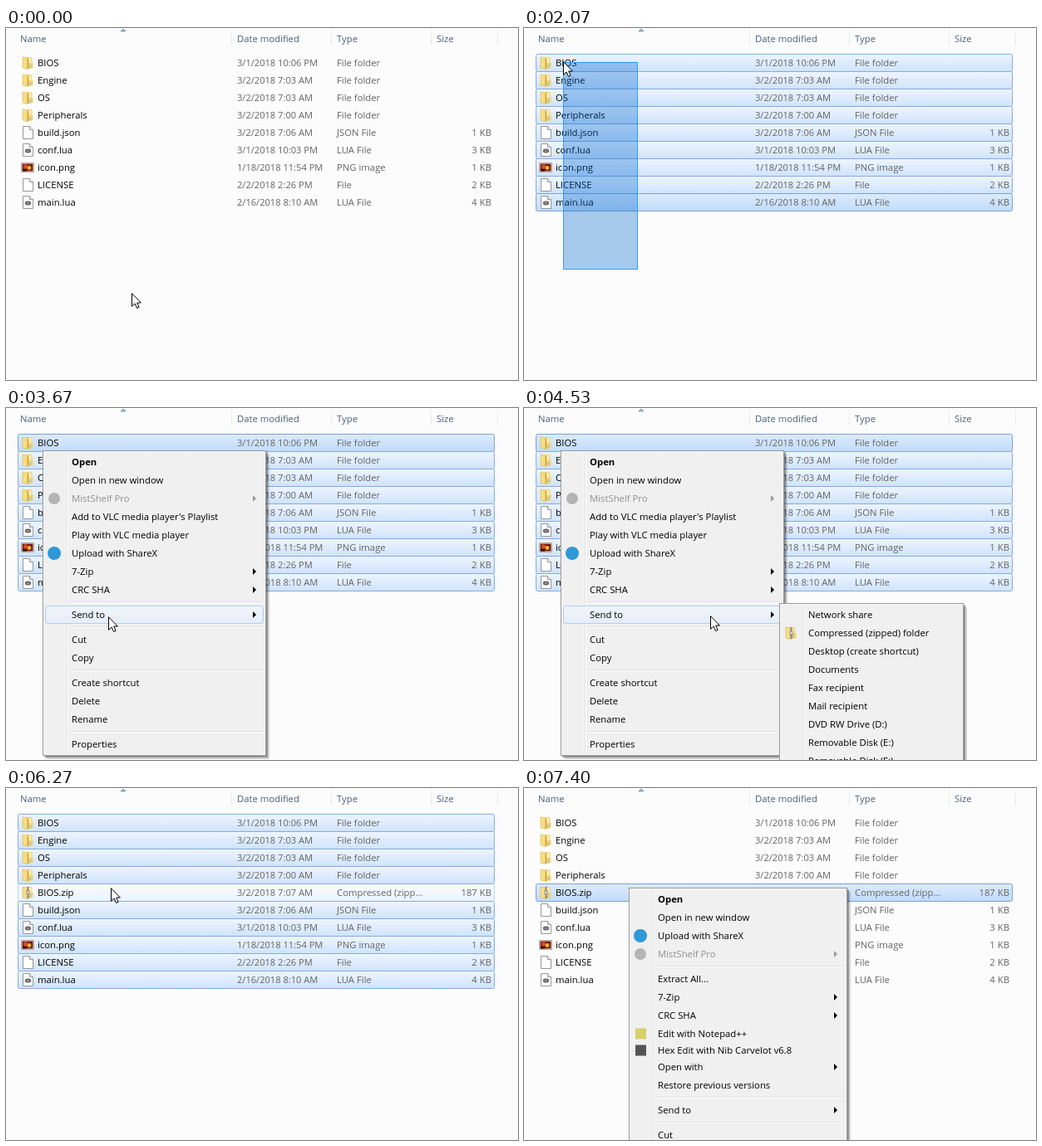
Write an HTML page that moves like this. It is 616 px wide and 424 px high and loops after 8 s.

```html
<!DOCTYPE html>
<html lang="en">
<head>
<meta charset="utf-8">
<title>File list</title>
<style>
html, body { margin: 0; width: 100%; height: 100%; overflow: hidden; background: #fcfcfc; }
svg { display: block; width: 616px; height: 424px; }
text { font: 11.3px "Open Sans", "Noto Sans", sans-serif; fill: #000; white-space: pre; }
.head text { fill: #4c607a; }
.meta { fill: #646464; }
.date { font-size: 11.1px; }
.end { text-anchor: end; }
.bold { font-weight: 700; }
.off { fill: #8f8f8f; }
.plate { stroke: none; fill: none; }
.picked { fill: url(#picked); stroke: #84acdd; }
.dark { fill: url(#dark); stroke: #7da2ce; }
.hover { fill: url(#hover); stroke: #b8d6fb; }
.hot { fill: url(#hot); stroke: #aecff7; }
.band { fill: rgba(0, 102, 204, .34); stroke: #39f; }
</style>
</head>
<body>
<svg id="stage" viewBox="0 0 616 424">
  <defs>
    <g id="folder">
      <path d="M7 1H12.5L13.5 2V8H14.5V14L9 15.5H7Z" fill="#f0d272"/>
      <path d="M9.5 2H12.5V8H9.5Z" fill="#faeeb8"/>
      <path d="M2 1 7.5 2V15.5L2 14Z" fill="#f6de86" stroke="#dcb850" stroke-width=".6"/>
      <path d="M8.5 3V15" stroke="#c99f3c"/>
      <path d="M10 10.5H12V13.5L10 14Z" fill="#a9c3c9"/>
    </g>
    <g id="zip">
      <use href="#folder"/>
      <path d="M8.5 1V15" stroke="#77756a" stroke-width="2.4" stroke-dasharray="1.2 1"/>
      <rect x="7" y="6" width="3" height="4" fill="#ddd" stroke="#777" stroke-width=".7"/>
    </g>
    <g id="page">
      <path d="M2.5 .5H10.5L14.5 4.5V15.5H2.5Z" fill="#fff" stroke="#979797"/>
      <path d="M10.5 .5V4.5H14.5" fill="#eee" stroke="#979797"/>
    </g>
    <g id="script">
      <use href="#page"/>
      <rect x="5" y="7" width="7" height="4" rx="1.2" fill="#6a6a6a"/>
      <path d="M6.5 6.5H10.5M6.5 11.5H10.5M7 9H10" stroke="#b5b5b5"/>
    </g>
    <g id="picture">
      <rect x=".5" y="2.5" width="15" height="11" fill="#fff" stroke="#b9a8a0"/>
      <rect x="1.5" y="3.5" width="13" height="9" fill="#6e1a0e"/>
      <circle cx="5.5" cy="7" r="2.7" fill="#d9481c"/>
      <circle cx="10" cy="8.5" r="2.4" fill="#f2b32c"/>
      <rect x="2" y="10" width="5" height="2.5" fill="#2c120c"/>
    </g>
  </defs>
</svg>
<script>
const stage = document.getElementById('stage');

function el(tag, attrs, parent = stage, text) {
  const node = document.createElementNS('http://www.w3.org/2000/svg', tag);
  for (const key in attrs) node.setAttribute(key, attrs[key]);
  if (text) node.textContent = text;
  parent.append(node);
  return node;
}
const label = (x, y, str, parent, cls = '') => el('text', { x, y, class: cls }, parent, str);
const box = (x, y, width, height, attrs, parent) => el('rect', { x, y, width, height, ...attrs }, parent);
const show = (node, on) => { node.style.display = on ? '' : 'none'; };

function gradient(id, top, bottom) {
  const g = el('linearGradient', { id, x2: 0, y2: 1 }, stage.querySelector('defs'));
  el('stop', { offset: 0, 'stop-color': top }, g);
  el('stop', { offset: 1, 'stop-color': bottom }, g);
}
gradient('picked', '#eef5fe', '#cfe3fd');
gradient('dark', '#dcebfc', '#c1dbfc');
gradient('hover', '#fafbfd', '#ebf3fd');
gradient('hot', '#f1f5fa', '#e5edf7');
gradient('rule', '#f4f7fb', '#d9e3ee');

// Column header
const head = el('g', { class: 'head' });
[['Name', 17], ['Date modified', 278], ['Type', 398], ['Size', 518]]
  .forEach(([str, x]) => label(x, 17, str, head));
for (const x of [271, 391, 511, 591]) box(x, 0, 1, 20, { fill: 'url(#rule)' }, head);
el('path', { d: 'M138 4 141 1 144 4Z', fill: '#9fcbe0', stroke: '#4f7f9e', 'stroke-width': .7 }, head);

// File rows
const ZIP = 4;
const PITCH = 21;
const rows = [
  ['folder', 'BIOS', '3/1/2018 10:06 PM', 'File folder'],
  ['folder', 'Engine', '3/2/2018 7:03 AM', 'File folder'],
  ['folder', 'OS', '3/2/2018 7:03 AM', 'File folder'],
  ['folder', 'Peripherals', '3/2/2018 7:00 AM', 'File folder'],
  ['zip', 'BIOS.zip', '3/2/2018 7:07 AM', 'Compressed (zipp...', '187 KB'],
  ['page', 'build.json', '3/2/2018 7:06 AM', 'JSON File', '1 KB'],
  ['script', 'conf.lua', '3/1/2018 10:03 PM', 'LUA File', '3 KB'],
  ['picture', 'icon.png', '1/18/2018 11:54 PM', 'PNG image', '1 KB'],
  ['page', 'LICENSE', '2/2/2018 2:26 PM', 'File', '2 KB'],
  ['script', 'main.lua', '2/16/2018 8:10 AM', 'LUA File', '4 KB']
].map(([icon, name, date, type, size]) => {
  const g = el('g');
  const plate = box(14.5, .5, 573, 21, { rx: 2, class: 'plate' }, g);
  el('use', { href: '#' + icon, x: 18, y: 3 }, g);
  label(38, 15, name, g);
  label(278, 15, date, g, 'meta date');
  label(398, 15, type, g, 'meta');
  if (size) label(584, 15, size, g, 'meta end');
  return { g, plate };
});
// Borders of picked neighbours lie over the hovered row
rows[0].g.before(rows[ZIP].g);

const band = box(0, 0, 0, 0, { class: 'band' });

// Context menus: '-' is a separator
function makeMenu(x, y, width, entries) {
  const g = el('g');
  const base = el('g', {}, g);
  const items = [];
  let top = y + 3;
  const rules = [];
  for (const entry of entries) {
    if (entry === '-') { rules.push(top + 3); top += 8; continue; }
    const [str, o = {}] = [].concat(entry);
    const height = o.h || 22;
    const mid = top + height / 2;
    const item = el('g', {}, g);
    const plate = box(x + 3.5, top + .5, width - 7, height - 1, { rx: 2.5, class: 'hot' }, item);
    if (o.dot) el('circle', { cx: x + 14, cy: mid, r: o.r || 7, fill: o.dot }, item);
    if (o.square) box(x + 8, mid - 6.5, 13, 13, { fill: o.square }, item);
    if (o.icon) el('use', { href: '#' + o.icon, x: x + 6, y: mid - 8 }, item);
    label(x + 35, mid + 4, str, item, o.off ? 'off' : o.bold ? 'bold' : '');
    if (o.arrow) el('path', { d: `M${x + width - 16} ${mid - 4}l4 4-4 4Z`, fill: o.off ? '#999' : '#000' }, item);
    items.push({ g: item, plate, str, top, bottom: top + height });
    top += height;
  }
  const height = top + 3 - y;
  box(x + 4, y + 4, width, height, { fill: '#000', opacity: .16, rx: 2 }, base);
  box(x + 2, y + 2, width, height, { fill: '#000', opacity: .3, rx: 1 }, base);
  box(x + .5, y + .5, width - 1, height - 1, { fill: '#f0f0f0', stroke: '#979797' }, base);
  box(x + 1.5, y + 1.5, width - 3, height - 3, { fill: 'none', stroke: '#f7f7f7' }, base);
  box(x + 29, y + 3, 1, height - 6, { fill: '#e2e3e3' }, base);
  box(x + 30, y + 3, 1, height - 6, { fill: '#fff' }, base);
  for (const r of rules) {
    box(x + 31, r, width - 34, 1, { fill: '#dfdfdf' }, base);
    box(x + 31, r + 1, width - 34, 1, { fill: '#fff' }, base);
  }
  return { g, base, items, left: x + 3, right: x + width - 3 };
}

const sub = { arrow: 1 };
const cloud = ['MistShelf Pro', { off: 1, arrow: 1, dot: '#b4b4b4' }];
const upload = ['Upload with ShareX', { dot: '#2f98d8', r: 8 }];

const fileMenu = makeMenu(44, 51, 269, [
  ['Open', { bold: 1 }], 'Open in new window', cloud,
  "Add to VLC media player's Playlist", 'Play with VLC media player', upload,
  ['7-Zip', sub], ['CRC SHA', sub], '-', ['Send to', sub], '-', 'Cut', 'Copy', '-',
  'Create shortcut', 'Delete', 'Rename', '-', 'Properties'
]);
const sendMenu = makeMenu(307, 235, 222, [
  'Network share', ['Compressed (zipped) folder', { icon: 'zip' }], 'Desktop (create shortcut)',
  'Documents', 'Fax recipient', 'Mail recipient', 'DVD RW Drive (D:)',
  'Removable Disk (E:)', 'Removable Disk (F:)'
]);
const zipMenu = makeMenu(126, 120, 263, [
  ['Open', { bold: 1 }], 'Open in new window', upload, cloud, '-',
  'Extract All...', ['7-Zip', sub], ['CRC SHA', sub],
  ['Edit with Notepad++', { square: '#d8cf6a' }],
  ['Hex Edit with Nib Carvelot v6.8', { square: '#555', h: 18 }],
  ['Open with', sub], 'Restore previous versions', '-', ['Send to', sub], '-', 'Cut', 'Copy'
]);

const cursor = el('path', {
  d: 'M.5 .7V16.3L4.1 13 6.6 18.5 9.1 17.4 6.7 12H11.4Z', fill: '#fff', stroke: '#000'
});

// Pointer path: tick, x, y (15 ticks per second)
const path = [
  [12, 151, 319], [15, 137, 291], [20, 89, 182], [24, 62, 82], [25, 57, 66],
  [31, 47, 40], [33, 47, 40], [34, 44, 51], [42, 44, 51], [48, 96, 150], [52, 117, 217],
  [55, 123, 251], [64, 123, 251], [71, 300, 249], [74, 350, 254], [76, 360, 265],
  [86, 360, 265], [91, 200, 160], [94, 126, 120], [103, 126, 120], [111, 190, 445]
];
function pointer(k) {
  const i = path.findIndex(p => p[0] >= k);
  if (i === 0) return path[0].slice(1);
  if (i < 0) return path[path.length - 1].slice(1);
  const [a, b] = [path[i - 1], path[i]];
  const f = (k - a[0]) / (b[0] - a[0]);
  return [1, 2].map(n => Math.round(a[n] + (b[n] - a[n]) * f));
}

const ANCHOR = [137, 291];
const fadeIn = (k, start) => Math.min(1, (k - start + 1) / 3);

function drawRows(k, x, y) {
  const hasZip = k >= 84;
  const dragging = k > 15 && k < 32;
  const reach = pointer(k - .5)[1];
  const canHover = k >= 80 && k < 102;
  rows.forEach(({ g, plate }, i) => {
    const top = 31 + PITCH * (i > ZIP && !hasZip ? i - 1 : i);
    show(g, i !== ZIP || hasZip);
    g.setAttribute('transform', `translate(0 ${top})`);
    const over = canHover && x >= 14 && x < 588 && y >= top && y < top + PITCH;
    let picked;
    if (k >= 96) picked = i === ZIP;
    else if (i === ZIP) picked = false;
    else picked = k >= 32 || dragging && reach < top + PITCH;
    const focus = i === 9 && k < 37 || i === 0 && k >= 32 && k < 87 || i === ZIP;
    let look = 'plate';
    if (picked) look = focus || over ? 'dark' : 'picked';
    else if (over) look = 'hover';
    plate.setAttribute('class', look);
  });
  show(band, dragging);
  if (dragging) {
    const [bx, by] = [x, pointer(k - .15)[1]];
    band.setAttribute('x', bx + .5);
    band.setAttribute('y', by + .5);
    band.setAttribute('width', Math.max(0, ANCHOR[0] - bx - 1));
    band.setAttribute('height', Math.max(0, ANCHOR[1] - by - 1));
  }
}

function drawMenu(menu, on, opacity, x, y, held) {
  show(menu.g, on);
  if (!on) return;
  menu.g.setAttribute('opacity', opacity);
  for (const item of menu.items) {
    item.hot = item.str === held ||
      !held && x >= menu.left && x < menu.right && y >= item.top && y < item.bottom;
    show(item.plate, item.hot);
  }
}

function draw(ms) {
  const k = Math.floor((ms + 4) * 15 / 1000);
  const [x, y] = pointer(k);
  drawRows(k, x, y);

  drawMenu(fileMenu, k >= 40 && k < 80, fadeIn(k, 40), x, y, k >= 60 ? 'Send to' : '');

  // The chosen entry lingers and fades after the click
  const chosen = k >= 80;
  drawMenu(sendMenu, k >= 60 && k < 84, chosen ? .9 - (k - 80) * .22 : fadeIn(k, 60), x, y);
  show(sendMenu.base, !chosen);
  for (const item of sendMenu.items) show(item.g, !chosen || item.hot);

  drawMenu(zipMenu, k >= 102, fadeIn(k, 102), x, y);
  cursor.setAttribute('transform', `translate(${x} ${y})`);
}

const start = performance.now();
function loop() {
  draw((performance.now() - start) % 8000);
  requestAnimationFrame(loop);
}
loop();
</script>
</body>
</html>
```
